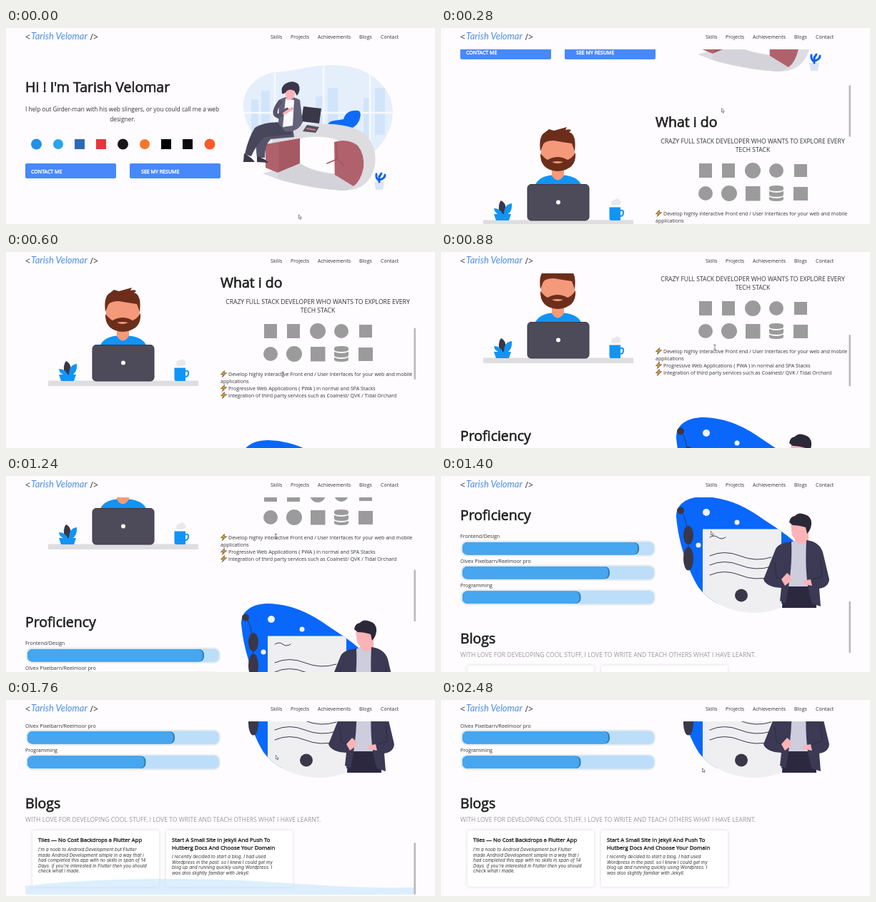
An HTML page that plays this animation: 600 by 275 pixels, repeating every 2520 ms.

```html
<!DOCTYPE html>
<html lang="en">
<head>
<meta charset="utf-8">
<title>Portfolio scroll</title>
<style>
@property --s { syntax: "<integer>"; inherits: true; initial-value: 0; }
html, body { margin: 0; width: 100%; height: 100%; overflow: hidden; background: #fefcff; }
svg { display: block; width: 600px; height: 275px; animation: scroll 2520ms infinite; }
text { font: 7.07px "Open Sans", sans-serif; fill: #333; white-space: pre; }
.bold { stroke: currentColor; stroke-width: .35; }
.h { font-size: 19.5px; fill: #212121; stroke: #212121; stroke-width: .65; }
.lead { font-size: 8.25px; }
.caps { font-size: 8.6px; }
.mid { text-anchor: middle; }
.white { fill: #fff; color: #fff; }
.tag { font-size: 12px; }
.logo { font: italic 13px Lato, sans-serif; fill: #4a90e2; }
.title { font-size: 7.78px; fill: #222; color: #222; }
.note { font: italic 6.3px Inter, sans-serif; }
.skin { fill: #fbb3b8; }
.dark { fill: #3a3748; }
.line { fill: none; stroke-linecap: round; }
.card { fill: #fff; filter: drop-shadow(0 0 2px #0002); }
.track { fill: #bddef8; stroke: #e8edf2; stroke-width: 2; }
.cap { fill: #2c7cc0; }
.fill { fill: #46a6ef; }

.page { transform: translateY(calc(var(--s) * -1px)); }
.thumb { transform: translateY(calc(var(--s) * .295px)); }
.bar { animation: bar 2520ms linear infinite; }
.mouse { animation: mouse 2520ms linear infinite; }
.arrow { animation: arrow 2520ms step-end infinite; }
.beam { animation: beam 2520ms step-end infinite; }
.wave { animation: wave 2520ms ease-in infinite; }

@keyframes scroll {
  0% { --s: 0; animation-timing-function: step-end; }
  .8% { --s: 0; animation-timing-function: cubic-bezier(.333, .48, .667, .78); }
  11.11% { --s: 167; animation-timing-function: cubic-bezier(.333, .54, .667, .81); }
  23.81% { --s: 256; animation-timing-function: cubic-bezier(.333, .72, .667, .91); }
  46.03% { --s: 300; animation-timing-function: cubic-bezier(.333, .03, .667, .38); }
  49.21% { --s: 340; animation-timing-function: cubic-bezier(.333, .34, .667, .73); }
  55.56% { --s: 490; animation-timing-function: cubic-bezier(.333, .71, .667, 1); }
  66%, 100% { --s: 574; }
}
@keyframes bar {
  0%, 1% { opacity: 0; }
  2%, 90% { opacity: 1; }
  97%, 100% { opacity: 0; }
}
@keyframes mouse {
  0% { transform: translate(409px, 262px); }
  11.11% { transform: translate(392px, 112px); }
  23.81% { transform: translate(386px, 168px); }
  49.21% { transform: translate(376px, 81px); }
  55.56%, 89% { transform: translate(377px, 77px); }
  98.41%, 100% { transform: translate(365px, 95px); }
}
@keyframes arrow { 0% { opacity: 1; } 22% { opacity: 0; } 51% { opacity: 1; } }
@keyframes beam { 0% { opacity: 0; } 22% { opacity: 1; } 51% { opacity: 0; } }
@keyframes wave {
  0%, 69.84% { transform: none; }
  87%, 100% { transform: translateY(28px); }
}
</style>
</head>
<body>
<svg viewBox="0 0 600 275">
<defs>
  <clipPath id="view"><rect y="30" width="600" height="245"/></clipPath>
  <clipPath id="blob"><path d="M329 58C329 40 345 30 367 30C400 31 425 44 444 57C465 72 490 85 505 105C530 140 500 193 440 193C405 193 375 178 360 157C345 132 332 95 329 58Z"/></clipPath>
  <path id="bolt" d="M5.5-7.5L.5-2.2L4-2.4L2.4 1.5L8.6-4.2L5-4Z" fill="#f5a623" stroke="#4a3a2a" stroke-width=".7"/>
</defs>

<g clip-path="url(#view)">
<g class="page">

  <!-- intro -->
  <text class="h" x="27" y="90">Hi ! I'm Tarish Velomar</text>
  <text class="lead mid" x="162.500" y="117">I help out Girder-man with his web slingers, or you could call me a web</text>
  <text class="lead mid" x="163" y="131">designer.</text>
  <circle cx="42.500" cy="163" r="7.500" fill="#2390e8"/>
  <circle cx="73" cy="163" r="7" fill="#2aa4ee"/>
  <rect x="96" y="156" width="14" height="14" fill="#2a6cb4"/>
  <rect x="126" y="156" width="14" height="14" fill="#e2393c"/>
  <circle cx="163.500" cy="163" r="7.500" fill="#17161a"/>
  <circle cx="194" cy="163" r="7" fill="#f5762c"/>
  <rect x="217" y="156" width="14" height="14"/>
  <rect x="247" y="156" width="14" height="14" fill="#0a0a0a"/>
  <circle cx="285" cy="163" r="7.500" fill="#fb5a2a"/>
  <rect x="27" y="190" width="127" height="21" rx="2" fill="#4788fa"/>
  <rect x="173" y="190" width="127" height="21" rx="2" fill="#4788fa"/>
  <text class="bold white" x="35" y="203.500">CONTACT ME</text>
  <text class="bold white" x="189" y="203.500">SEE MY RESUME</text>

  <!-- desk scene -->
  <path d="M332 112C330 88 350 64 378 62C405 60 420 53 455 52C500 50 541 78 541 118C541 150 515 190 470 190C400 190 336 168 332 112Z" fill="#e5effc"/>
  <path d="M343 100h10v50h-10zM357 88h12v62h-12zM433 96h10v46h-10zM450 84h14v56h-14zM500 98h10v56h-10zM516 84h14v66h-14z" fill="#d2e4fa"/>
  <path class="line" d="M334 119H541M376 64V150M444 55V140M509 66V160" stroke="#f6f9fe" stroke-width="2.500"/>
  <path d="M451 140Q448 131 459 130L472 128Q476 114 493 116Q498 118 494 130Q489 141 476 142Z" fill="#0e6bf6"/>
  <path d="M372 158Q385 140 411 137Q470 129 498 146Q520 163 516 193Q508 229 470 228Q430 226 385 214L359 204L380 198Z" fill="#dcdce1"/>
  <path d="M411 155Q440 149 466 158V205Q430 202 411 190Z" fill="#fefcff"/>
  <path d="M459 160Q478 154 492 165Q502 178 500 196Q496 215 486 222Q472 224 460 220Z" fill="#b0626c"/>
  <path class="line" d="M462 160L463 184L449 190M463 184L473 193" stroke="#a4505c" stroke-width="1.500"/>
  <path d="M363 163L411 155V190L380 203L363 196Z" fill="#b0626c"/>
  <path d="M382 160L411 155V190L382 202Z" fill="#a65962"/>
  <path d="M380 203L411 190Q431 203 460 206L486 222Q478 228 470 228Q425 225 380 211Z" fill="#d3d3d9"/>
  <path d="M415 145L421 136L438 139L433 147Z" fill="#575260"/>
  <path class="line" d="M421 141l11 2" stroke="#c8808a" stroke-width="2"/>
  <path d="M416 110L441 113L438 134L413 131Z" class="dark"/>
  <path d="M400 135Q378 131 357 138Q347 152 351 182L362 182Q362 164 370 156L403 153Z" fill="#56546a"/>
  <path d="M390 133Q364 130 348 140Q339 154 334 177L343 180Q351 162 362 153L400 149Z" fill="#48465b"/>
  <path d="M333 176Q343 181 348 188L332 188ZM351 180Q362 183 367 189L351 188Z" class="dark"/>
  <path d="M382 101Q396 92 411 101L415 132Q408 147 390 145L381 134Z" fill="#64627a"/>
  <path d="M391 99L403 101L401 137L387 139Z" fill="#fafafd"/>
  <path d="M389 86Q403 83 404 92Q404 101 393 101Z" class="skin"/>
  <path d="M386 92Q384 82 391 78Q401 72 409 79Q413 87 407 95L403 88Q397 85 393 88Q390 93 386 92Z" class="dark"/>
  <path class="line" d="M383 104Q371 121 381 124L393 115" stroke="#56546a" stroke-width="6"/>
  <path class="line" d="M389 120L400 113" stroke="#fbb3b8" stroke-width="4"/>
  <path d="M515 216h14l-2 11h-10z" fill="#dbe5f3"/>
  <path class="line" d="M522 216V208M522 214Q517 212 518 205M523 213Q530 211 530 206M522 209l3-5" stroke="#0f63ee" stroke-width="3"/>

  <!-- skills -->
  <g transform="translate(0 256)">
    <rect x="59" y="180.500" width="210" height="7.500" fill="#dedee0"/>
    <path d="M131 133Q136 117 163 117Q192 117 197 133Z" fill="#1294f5"/>
    <path d="M155 104H172V118Q163 131 155 118Z" fill="#f79a78"/>
    <path d="M140 66H187V92Q184 110 163 111Q143 110 140 92Z" fill="#f4997a"/>
    <path d="M139 87Q145 94 149 96Q163 88 177 96Q183 94 188 86Q190 110 163 112Q138 110 139 87ZM155 99Q163 103 171 99Q163 97 155 99Z" fill="#6c2e1b" fill-rule="evenodd"/>
    <path d="M139 84Q136 62 146 57L151 53L158 55L176 50L174 54Q181 52 182 55L179 57Q190 60 187 84L183 73Q169 71 158 69Q146 69 143 74Z" fill="#6c2e1b"/>
    <rect x="121" y="130.500" width="86" height="50.500" rx="5" fill="#4d4a59" stroke="#3c3948"/>
    <circle cx="164" cy="155.500" r="3" fill="#fff"/>
    <path d="M82 173Q79 158 84 153Q93 157 90 173Z" class="dark"/>
    <path d="M88 173Q88 158 99 157Q100 169 92 173ZM84 173Q75 172 74 164Q83 164 87 173ZM74 172H98L95 181H77Z" fill="#1294f5"/>
    <path d="M235.500 162.500H251V181H238Q235.500 181 235.500 178Z" fill="#1294f5"/>
    <path class="line" d="M251 167Q256 166 255 171Q255 175 250 175" stroke="#1294f5" stroke-width="2"/>
    <path d="M239 160Q236 152 243 152Q249 147 252 157Q248 161 239 160Z" fill="#e9e9ec"/>

    <text class="h" x="300" y="50">What i do</text>
    <text class="caps mid" x="436" y="73">CRAZY FULL STACK DEVELOPER WHO WANTS TO EXPLORE EVERY</text>
    <text class="caps mid" x="436" y="85">TECH STACK</text>
    <g fill="#9b9b9b">
      <rect x="361" y="101" width="18" height="20"/>
      <rect x="393" y="101" width="18" height="20"/>
      <circle cx="436" cy="111" r="11"/>
      <circle cx="469" cy="111" r="10"/>
      <rect x="494" y="102" width="18" height="18"/>
      <circle cx="370" cy="143" r="10"/>
      <circle cx="403" cy="143" r="11"/>
      <rect x="426" y="133" width="20.500" height="20.500"/>
      <path d="M459 135Q459 132 469 132T479 135V137Q479 140 469 140T459 137ZM459 140Q469 144 479 140V145Q479 148 469 148T459 145ZM459 148Q469 152 479 148V151Q479 154 469 154T459 151Z"/>
      <rect x="493" y="134" width="20" height="19"/>
    </g>
    <use href="#bolt" x="300" y="174"/>
    <text x="311" y="174">Develop highly interactive Front end / User Interfaces for your web and mobile</text>
    <text x="300" y="184">applications</text>
    <use href="#bolt" x="300" y="194"/>
    <text x="311" y="194">Progressive Web Applications ( PWA ) in normal and SPA Stacks</text>
    <use href="#bolt" x="300" y="204"/>
    <text x="311" y="204">Integration of third party services such as Coalnest/ QVK / Tidal Orchard</text>
  </g>

  <!-- proficiency -->
  <g transform="translate(0 490)">
    <text class="h" x="27" y="63">Proficiency</text>
    <text x="27" y="88">Frontend/Design</text>
    <rect class="track" x="28.500" y="92.500" width="270.500" height="20.500" rx="8"/>
    <rect class="cap" x="30" y="94" width="247" height="17.500" rx="7"/>
    <rect class="fill" x="30" y="94" width="245" height="17.500" rx="7"/>
    <text x="27" y="122.500">Olvex Pixelbarn/Reelmoor pro</text>
    <rect class="track" x="28.500" y="126.500" width="270.500" height="20.500" rx="8"/>
    <rect class="cap" x="30" y="128" width="206" height="17.500" rx="7"/>
    <rect class="fill" x="30" y="128" width="204" height="17.500" rx="7"/>
    <text x="27" y="156.500">Programming</text>
    <rect class="track" x="28.500" y="161" width="270.500" height="20.500" rx="8"/>
    <rect class="cap" x="30" y="162.500" width="165.500" height="17.500" rx="7"/>
    <rect class="fill" x="30" y="162.500" width="163.500" height="17.500" rx="7"/>

    <g clip-path="url(#blob)">
      <path d="M320 20H530V180H366V200H320Z" fill="#0967fb"/>
      <rect x="366" y="75.500" width="110" height="120" fill="#efeff1"/>
    </g>
    <path class="line" d="M335 50Q347 60 346 117" stroke="#3a3748"/>
    <g class="dark">
      <circle cx="335" cy="49.500" r="5"/>
      <ellipse cx="346" cy="84" rx="7" ry="13"/>
      <ellipse cx="346" cy="117" rx="7" ry="16.500"/>
      <circle cx="420" cy="168.500" r="9"/>
    </g>
    <g fill="#f1f1f4">
      <circle cx="371" cy="52" r="5"/><circle cx="414" cy="66" r="3.500"/><circle cx="360" cy="98" r="3.500"/>
    </g>
    <path class="line" d="M376 87q6-4 11 0t11 0M376 113q20-9 42 0t44 2M376 126q20-9 42 0t44 2M376 140q20-9 42 0t44 2" stroke="#3a3748"/>
    <path d="M479 145H524L525 186H477Z" fill="#2b2840"/>
    <path d="M485 97L500 88L513 97L513 156H483Z" fill="#cdcddd"/>
    <path d="M489 68H514V93Q504 101 497 93L491 84Z" class="skin"/>
    <path d="M487 66Q488 58 495 57Q500 51 509 55Q519 58 518 69Q517 77 512 82L510 73Q500 70 492 70Z" fill="#2b2838"/>
    <path d="M490 93Q470 95 467 106L451 146Q455 157 476 158L474 176L482 180Q492 130 490 93Z" fill="#3b3953"/>
    <path d="M511 91Q529 93 534 108L543 146Q542 157 529 159L531 184L519 180Q508 150 511 91Z" fill="#3b3953"/>
    <path class="line" d="M531 117L533 142L520 146M467 122L469 143L478 147" stroke="#2d2b42"/>
    <path d="M476 146L484 137Q491 142 490 148L481 155ZM506 148L517 146L519 155L508 153Z" class="skin"/>
  </g>

  <!-- blogs -->
  <g transform="translate(0 574)">
    <text class="h" x="27" y="152">Blogs</text>
    <text class="caps" style="fill:#999" x="27" y="170.500">WITH LOVE FOR DEVELOPING COOL STUFF, I LOVE TO WRITE AND TEACH OTHERS WHAT I HAVE LEARNT.</text>
    <rect class="card" x="37" y="183" width="177" height="79" rx="2"/>
    <rect class="card" x="224" y="183" width="177" height="79" rx="2"/>
    <text class="title bold" x="45" y="199">Tiles — No Cost Backdrops a Flutter App</text>
    <text class="note" x="45" y="212">I'm a noob to Android Development but Flutter</text>
    <text class="note" x="45" y="219.500">made Android Development simple in a way that i</text>
    <text class="note" x="45" y="227">had completed this app with no skills in span of 14</text>
    <text class="note" x="45" y="234.500">Days. if you're interested in Flutter then you should</text>
    <text class="note" x="45" y="242">check what i made.</text>
    <text class="title bold" x="232" y="199">Start A Small Site In Jekyll And Push To</text>
    <text class="title bold" x="232" y="210">Hutberg Docs And Choose Your Domain</text>
    <text class="note" x="232" y="222">I recently decided to start a blog. I had used</text>
    <text class="note" x="232" y="229.500">Wordpress in the past. so I knew I could get my</text>
    <text class="note" x="232" y="237">blog up and running quickly using Wordpress. I</text>
    <text class="note" x="232" y="244.500">was also slightly familiar with Jekyll.</text>
    <path class="wave" d="M27 261C120 250 220 250 300 252S480 266 573 263V273H27Z" fill="#bfe2fb" fill-opacity=".55"/>
  </g>
</g>
</g>

<!-- fixed header -->
<text class="tag" x="27" y="16.500">&lt;</text>
<text class="logo" x="35" y="16">Tarish Velomar</text>
<text class="tag" x="117.500" y="16.500">/&gt;</text>
<text x="370" y="15">Skills</text>
<text x="398" y="15">Projects</text>
<text x="436" y="15">Achievements</text>
<text x="494" y="15">Blogs</text>
<text x="524" y="15">Contact</text>

<g class="bar"><rect class="thumb" x="570.500" y="31" width="2.500" height="72.500" rx="1" fill="#b8b8ba"/></g>
<g class="mouse">
  <path class="arrow" d="M.5.5V6L1.800 4.900L2.800 7L3.700 6.600L2.800 4.600H4.300Z" fill="#fff" stroke="#555" stroke-width=".7"/>
  <path class="beam line" d="M0 .5H2.400M1.200.5V7M0 7H2.400" stroke="#444" stroke-width=".7"/>
</g>
</svg>
</body>
</html>
```
